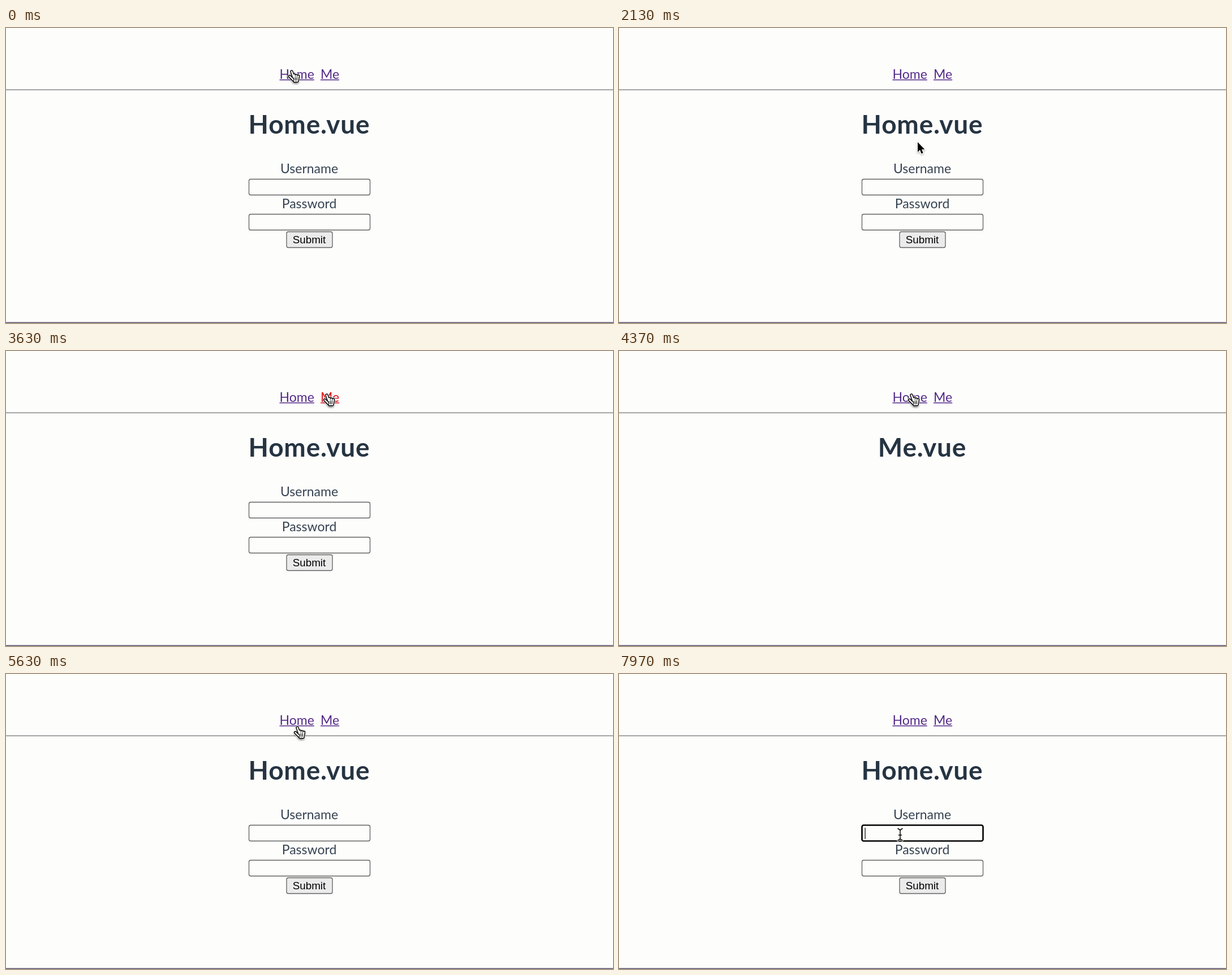
An HTML page with a canvas that plays this animation: 1073x522 px, repeating every 7990 ms.

```html
<!DOCTYPE html>
<html lang="en">
<head>
<meta charset="utf-8">
<title>Home.vue</title>
<style>
  html, body { margin: 0; width: 100%; height: 100%; overflow: hidden; background: #fdfdfc; }
  canvas { display: block; }
</style>
</head>
<body>
<canvas id="stage" width="1073" height="522"></canvas>
<script>
const ctx = document.getElementById('stage').getContext('2d');
const W = 1073, H = 522, MID = 536, LOOP = 7990;
const TITLE_INK = '#263442', INK = '#364351', LINK = '#542a88', BORDER = '#606060';
const BODY = '23px Lato, sans-serif';
const TITLE = 'bold 46px Lato, sans-serif';
const BUTTON = '18.8px "Liberation Sans", Arial, sans-serif';

// Places the pointer visits
const spot = (x, y) => ({ x, y });
const home = spot(517, 76), me = spot(567, 76), title = spot(535, 178);
const gap = spot(528, 202), field = spot(497, 284);

// Each move eases from the previous place
const START = spot(505, 75);
const MOVES = [
  { from: 260, to: 870, at: title },
  { from: 1110, to: 2130, at: gap },
  { from: 2790, to: 3450, at: me },
  { from: 3800, to: 4330, at: home },
  { from: 5400, to: 5630, at: spot(515, 93) },
  { from: 5630, to: 6890, at: field }
];

const clamp = v => Math.min(1, Math.max(0, v));
const ease = u => u * u * (3 - 2 * u);

function pointerAt(t) {
  return MOVES.reduce((p, { from, to, at }) => {
    const k = ease(clamp((t - from) / (to - from)));
    return spot(p.x + (at.x - p.x) * k, p.y + (at.y - p.y) * k);
  }, START);
}

function text(str, x, y, font, color, align = 'center') {
  ctx.font = font;
  ctx.fillStyle = color;
  ctx.textAlign = align;
  ctx.fillText(str, x, y);
}

function link(str, x, color) {
  text(str, x, 90, BODY, color, 'left');
  ctx.fillRect(x, 91, ctx.measureText(str).width, 1.5);
}

function box(y, w, stroke = BORDER, line = 1.3, fill = '#fdfdfc') {
  ctx.beginPath();
  ctx.roundRect(MID + 0.5 - w / 2, y + 0.5, w, 28, 3);
  ctx.fillStyle = fill;
  ctx.fill();
  ctx.strokeStyle = stroke;
  ctx.lineWidth = line;
  ctx.stroke();
}

function form(focused) {
  ['Username', 'Password'].forEach((label, i) => {
    const y = 267 + 62 * i;
    text(label, MID, y - 10, BODY, INK);
    if (focused && i === 0) {
      box(y, 214, '#000', 2.6);
      ctx.fillStyle = '#000';
      ctx.fillRect(434.5, y + 5, 1.2, 20);
    } else {
      box(y, 214);
    }
  });
  box(360, 81, BORDER, 1.3, '#ebebeb');
  text('Submit', MID, 381, BUTTON, '#000');
}

function line(x0, y0, x1, y1, width) {
  ctx.lineWidth = width;
  ctx.beginPath();
  ctx.moveTo(x0, y0);
  ctx.lineTo(x1, y1);
  ctx.stroke();
}

// Grown copies of the same hand form its halo, outline and skin
function handShape(color, grow) {
  ctx.strokeStyle = color;
  line(0, 2, 4, 14, 2.4 + grow);
  line(-3.5, 10.5, 3, 17, 2.4 + grow);
  for (let i = 0; i < 3; i++) line(4.5 + 3.5 * i, 8 + i, 5 + 2.5 * i, 19, 2.6 + grow);
}

function hand() {
  handShape('#fff', 4.6);
  ctx.shadowColor = 'transparent';
  handShape('#000', 3);
  handShape('#fff', 0);
  ctx.strokeStyle = '#000';
  for (let i = 0; i < 3; i++) line(3.6 + 2.8 * i, 13, 3.6 + 2.8 * i, 17.5, 1.2);
}

function arrow() {
  const shape = new Path2D('M0 0V17.5L4 13.8 6.6 20.2 9.6 19 7 12.8H12.3Z');
  ctx.strokeStyle = '#fff';
  ctx.lineWidth = 2.6;
  ctx.stroke(shape);
  ctx.shadowColor = 'transparent';
  ctx.fill(shape);
}

function beam() {
  ctx.shadowColor = 'transparent';
  for (const [color, width] of [['#fff', 3.4], ['#000', 1.5]]) {
    ctx.strokeStyle = color;
    line(0, -8, 0, 8, width);
    line(-2.5, 1, 2.5, 1, width);
    for (const end of [-1, 1]) {
      for (const side of [-4, 4]) line(0, 8 * end, side, 10.5 * end, width);
    }
  }
}

function pointerKind({ x, y }, onMe) {
  const near = (cx, cy, w, h) => Math.abs(x - cx) < w / 2 && Math.abs(y - cy) < h / 2;
  if (near(514, 82, 62, 30) || near(572, 82, 33, 30)) return hand;
  const overText = near(MID, 172, 212, 48);
  const overForm = !onMe && (near(MID, 249, 100, 26) || near(MID, 281, 215, 30));
  return overText || overForm ? beam : arrow;
}

function pointer(p, onMe) {
  ctx.save();
  ctx.translate(p.x, p.y);
  ctx.lineJoin = ctx.lineCap = 'round';
  ctx.fillStyle = '#000';
  ctx.shadowColor = 'rgba(0,0,0,.3)';
  ctx.shadowBlur = 3;
  ctx.shadowOffsetY = 1.5;
  pointerKind(p, onMe)();
  ctx.restore();
}

function draw(t) {
  const onMe = t >= 3720 && t < 5400;
  const pressed = t >= 3590 && t < 3720;
  ctx.fillStyle = '#fdfdfc';
  ctx.fillRect(0, 0, W, H);
  ctx.fillStyle = '#858585';
  ctx.fillRect(0, 108.6, W, 1.5);
  ctx.fillStyle = '#625c78';
  ctx.fillRect(0, 520.4, W, 1.6);
  link('Home', 483.5, LINK);
  link('Me', 556, pressed ? '#e01018' : LINK);
  ctx.letterSpacing = '0.8px';
  text(onMe ? 'Me.vue' : 'Home.vue', MID, 187, TITLE, TITLE_INK);
  ctx.letterSpacing = '0px';
  if (!onMe) form(t >= 7500);
  pointer(pointerAt(t), onMe);
}

const start = performance.now();
function tick() {
  draw((performance.now() - start) % LOOP);
  requestAnimationFrame(tick);
}
tick();
</script>
</body>
</html>
```
